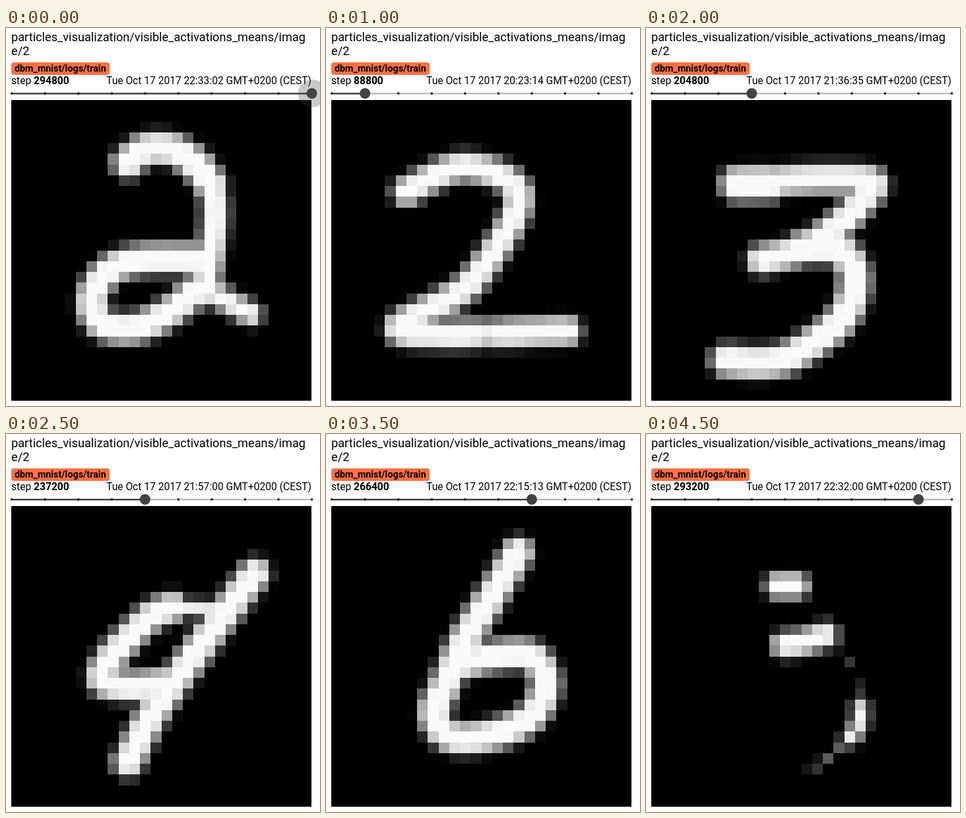
These frames come from a looping animation (476x572 px, 5000 ms). An HTML page:

```html
<!DOCTYPE html>
<html lang="en">
<head>
<meta charset="utf-8">
<title>Image slider</title>
<style>
  html, body { margin: 0; width: 100%; height: 100%; overflow: hidden; background: #fff; }
  svg { display: block; width: 476px; height: 572px; font-family: Roboto, sans-serif; }
  .title { font-size: 18.2px; }
  .tag { font-size: 14.3px; font-weight: bold; }
  .info { font-size: 15.6px; white-space: pre; }
  .cells { shape-rendering: crispEdges; }
</style>
</head>
<body>
<svg viewBox="0 0 476 572">
  <text class="title" x="8" y="20">particles_visualization/visible_activations_means/imag</text>
  <text class="title" x="8" y="41">e/2</text>
  <rect x="8" y="52" width="149" height="19" rx="4" fill="#ff7043"/>
  <text class="tag" x="13" y="65.5">dbm_mnist/logs/train</text>
  <text class="info" x="8" y="85">step <tspan id="step" font-weight="bold"></tspan></text>
  <text class="info" id="date" x="463" y="85" text-anchor="end"></text>
  <rect x="8" y="98" width="455" height="2.4" fill="#bdbdbd"/>
  <rect id="bar" x="8" y="98" height="2.4" fill="#424242"/>
  <g id="ticks"></g>
  <rect x="8" y="109" width="455" height="455"/>
  <g id="cells" class="cells"></g>
  <circle id="halo" cy="99" r="21" fill="#424242" fill-opacity=".28"/>
  <circle id="knob" cy="99" fill="#424242"/>
</svg>
<script>
const GRID = 28, SIZE = 455, CELL = SIZE / GRID, LEFT = 8, TOP = 109;
const HOLD = 500, SOFT = 0.85;
const $ = id => document.getElementById(id);

function addRect(parent, attrs) {
  const el = document.createElementNS('http://www.w3.org/2000/svg', 'rect');
  for (const k in attrs) el.setAttribute(k, attrs[k]);
  parent.appendChild(el);
  return el;
}

const spline = (a, b, c, d, t) =>
  b + t / 2 * (c - a + t * (2 * a - 5 * b + 4 * c - d + t * (3 * (b - c) + d - a)));

// One smooth pen stroke through a few points, in grid units; a radius below zero leaves a faint trace
function pen(radius, points) {
  const keys = points.split(' ').map(p => p.split(',').map(Number));
  const at = i => keys[Math.max(0, Math.min(keys.length - 1, i))];
  const dots = [];
  for (let i = 0; i < keys.length - 1; i++)
    for (let t = 0; t <= 1; t += 1 / 16)
      dots.push([0, 1].map(k => spline(at(i - 1)[k], at(i)[k], at(i + 1)[k], at(i + 2)[k], t)));
  return (x, y) => radius - Math.min(...dots.map(([px, py]) => Math.hypot(x - px, y - py)));
}

const scenes = [
  { step: 294800, clock: '22:33:02', strokes: [
    pen(1.45, '10.9,5.8 12.5,4.6 15,4.6 17.2,6 18.6,7.8'),
    pen(1.2, '18.6,7.5 19,10 18.8,13 18,18'),
    pen(1.4, '17.5,17.5 14.8,19.7 11.5,21.2 8.5,20.8 7.5,18.6 9,16 12,14.9 17.5,14.8'),
    pen(1.05, '18.5,17.8 22.3,19.9')
  ] },
  { step: 48800, clock: '19:58:11', strokes: [
    pen(1.1, '9.9,12.7 9.4,10.5 10.2,8.2'),
    pen(.85, '10.4,7.7 13,7.5 15.5,8'),
    pen(1.2, '16,8.5 16.8,11 16.6,16 16.3,25'),
    pen(.5, '12.8,17.4 15,16.2')
  ] },
  { step: 88800, clock: '20:23:14', strokes: [
    pen(1.3, '7,8.5 12.5,6.2 17.5,9 13,17 6.5,21.5 22,21.5')
  ] },
  { step: 128000, clock: '20:48:02', strokes: [
    pen(1.45, '9.2,8 11,7 13.5,6.4 16,7.4 16.4,9.3 15,11.8 12,14'),
    pen(1.35, '12,14 15.5,13.7 18.3,15.2 19.8,18 19,21.4'),
    pen(1.2, '8.4,21.3 9.2,23 12,23.6 16,23.4 19,21.6')
  ] },
  { step: 204800, clock: '21:36:35', strokes: [
    pen(1.6, '8,7.8 11,7.75'),
    pen(1.35, '11,7.6 16,7.3 20.6,7.6 19.5,9.5 17.6,11.5 14,13.9 10.3,14.85'),
    pen(1.45, '14,13.8 17.5,14 19,16.5 17.8,20.3 13.5,23.6 10.5,24.4 7,24.2')
  ] },
  { step: 237200, clock: '21:57:00', strokes: [
    pen(1.35, '15,9.4 13,10.3 10.7,12.5 9,14.5 8.5,16.2 11,16.8 14.5,16.5'),
    pen(.65, '15,9.4 18.5,9.6'),
    pen(1.4, '22.7,6.3 17.3,13.5 13.2,19.3 10.9,23.8')
  ] },
  { step: 252400, clock: '22:06:27', strokes: [
    pen(1.3, '9,8.5 18.5,8 16,15 13.6,25')
  ] },
  { step: 266400, clock: '22:15:13', strokes: [
    pen(1.4, '17.4,4.3 14.9,8.5 12.4,12.5 10.7,16.5 9.6,19.3 11.2,21.5 15,21.3 18.6,19.6 20,16.5 18.6,14 15,14 11.8,14.8')
  ] },
  { step: 281200, clock: '22:24:31', strokes: [
    pen(1.3, '18.5,7.5 15,5.8 11.5,9 18,17 14,23 11,20 18.5,7.5')
  ] },
  { step: 293200, clock: '22:32:00', strokes: [
    pen(1.15, '11.8,7.4 13.5,7.4'),
    pen(-.35, '12,9 12.2,13 12,17'),
    pen(1.15, '12.4,12.9 14,12.7 16.2,12'),
    pen(-.3, '17.5,13 19.2,16 19.6,19'),
    pen(.7, '19.5,18.8 19.4,20.3 18.6,21.5'),
    pen(-.05, '17.8,22.4 15,24.5')
  ] }
];

// Soft pen coverage at each cell centre
function shade(strokes) {
  return Array.from({ length: GRID * GRID }, (_, i) => {
    const x = i % GRID + .5, y = Math.floor(i / GRID) + .5;
    const depth = Math.max(...strokes.map(s => s(x, y)));
    const t = Math.max(0, Math.min(1, (depth + SOFT) / (2 * SOFT)));
    return Math.round(250 * t * t * (3 - 2 * t));
  });
}

const shades = scenes.map(s => shade(s.strokes));
const cells = shades[0].map((_, i) => addRect($('cells'), {
  x: LEFT + i % GRID * CELL, y: TOP + Math.floor(i / GRID) * CELL, width: CELL, height: CELL
}));

const stopX = i => LEFT + .6 + i * SIZE / 9;
for (let i = 0; i < 10; i++)
  addRect($('ticks'), { x: stopX(i) - 1.5, y: 97.5, width: 3, height: 3 });

let shown = -1;
function draw(time) {
  const n = Math.floor(time / HOLD) % scenes.length;
  if (n === shown) return;
  shown = n;
  const { step, clock } = scenes[n];
  const x = stopX((n + 9) % 10);
  $('step').textContent = step;
  $('date').textContent = `Tue Oct 17 2017 ${clock} GMT+0200 (CEST)`;
  $('bar').setAttribute('width', x - LEFT);
  $('knob').setAttribute('cx', x);
  $('knob').setAttribute('r', n === 1 ? 12 : 8);
  $('halo').setAttribute('cx', x);
  $('halo').setAttribute('visibility', n === 0 ? 'visible' : 'hidden');
  shades[n].forEach((v, i) => cells[i].setAttribute('fill', `rgb(${v},${v},${v})`));
}

const start = performance.now();
function tick() {
  draw(performance.now() - start);
  requestAnimationFrame(tick);
}
tick();
</script>
</body>
</html>
```
